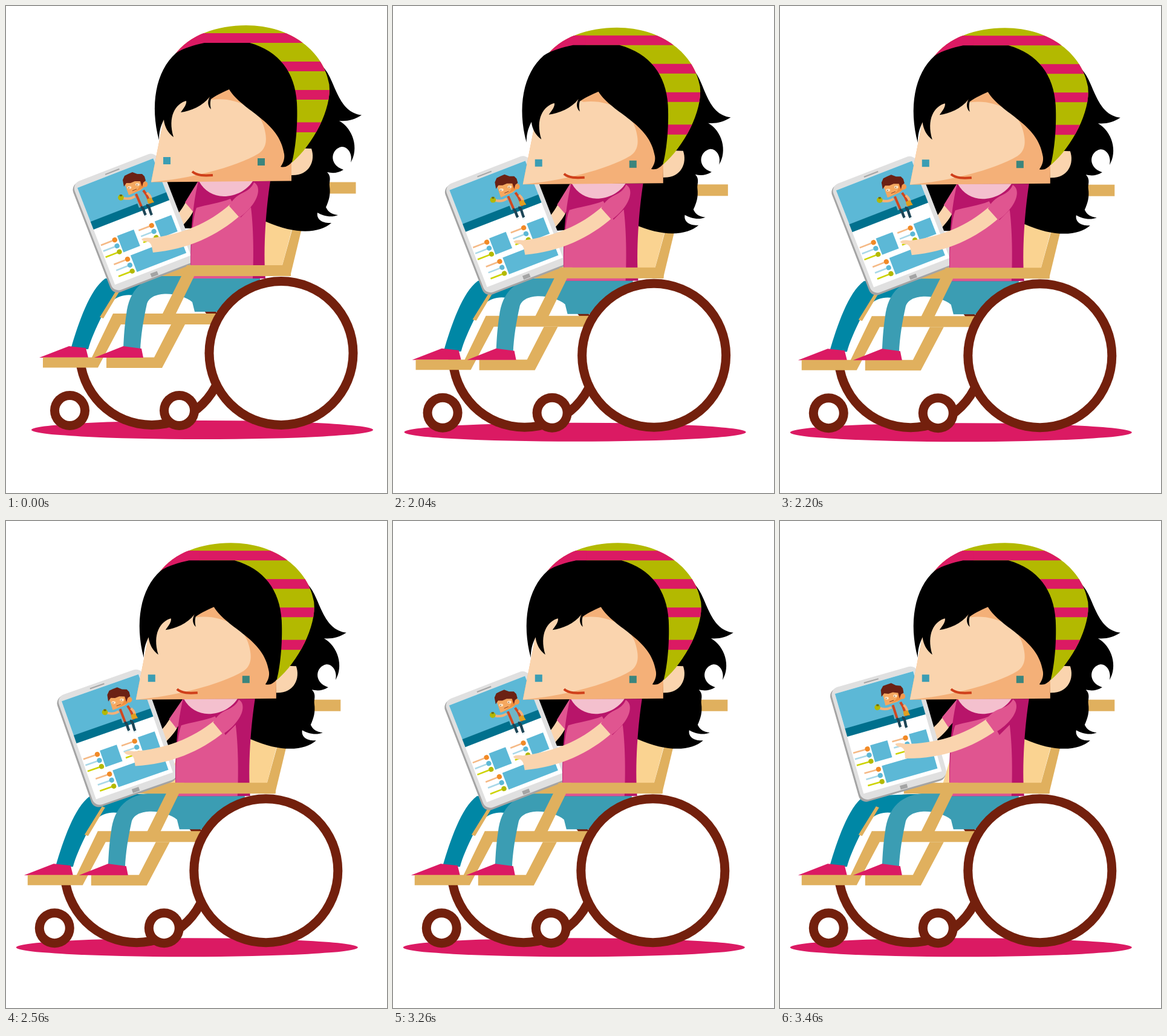
Recreate the animation shown at these times as an HTML page with a canvas. Size 630 px wide and 806 px high, loop 5500 ms.

```html
<!DOCTYPE html>
<html lang="en">
<head>
<meta charset="utf-8">
<title>Girl with tablet</title>
<style>
  html, body { margin: 0; width: 100%; height: 100%; overflow: hidden; background: #fff; }
  canvas { display: block; width: 630px; height: 806px; }
</style>
</head>
<body>
<canvas id="stage" width="630" height="806"></canvas>
<script>
const ctx = document.getElementById('stage').getContext('2d');
const LOOP = 5500, STEP = 40, RAD = Math.PI / 180;
const C = {
  tan: '#e0b05e', sand: '#fad391', brown: '#73200d', pink: '#db1a63',
  shirt: '#e05590', plum: '#b8156a', collar: '#f4c0ce',
  skin: '#fad4ae', shade: '#f4b078', teal: '#3b9db3', deep: '#0087a5',
  lime: '#b3b900', blue: '#5cb8d6', band: '#00708d', orange: '#f28a26', hair: '#000'
};

const paths = new Map();
function shape(d) {
  if (!paths.has(d)) paths.set(d, new Path2D(d));
  return paths.get(d);
}
function fill(color, d) {
  ctx.fillStyle = color;
  ctx.fill(shape(d));
}
function line(color, width, d) {
  ctx.strokeStyle = color;
  ctx.lineWidth = width;
  ctx.stroke(shape(d));
}
function rect(color, x, y, w, h) {
  ctx.fillStyle = color;
  ctx.fillRect(x, y, w, h);
}
function oval(color, x, y, rx, ry = rx) {
  ctx.fillStyle = color;
  ctx.beginPath();
  ctx.ellipse(x, y, rx, ry, 0, 0, 7);
  ctx.fill();
}
function wheel(x, y, r) {
  oval(C.brown, x, y, r);
  oval('#fff', x, y, r - 15);
}
function group(draw) {
  ctx.save();
  draw();
  ctx.restore();
}
function turn(x, y, deg) {
  ctx.translate(x, y);
  ctx.rotate(deg * RAD);
  ctx.translate(-x, -y);
}

function backHair() {
  fill(C.hair, 'M500 70L527 104C545 126 549 176 588 180.5C575 189 564 191 551 190' +
    'C574 203 584 236 570 259C574 244 564 232 555 233C538 236 532 262 558 271' +
    'C548 277 540 277 531 275C539 283 534 291 535 298C537 312 534 322 529 333' +
    'C533 342 540 345 549 346C537 351 524 347 515 342C513 353 523 360 538 359' +
    'C520 375 482 380 430 357L306 368L290 368L262 350V285L420 70Z');
}

function backrest() {
  fill(C.sand, 'M312 371L312 350H478L456 432H294Z');
  fill(C.tan, 'M476 360H491L470 447H452Z');
}

function rearArm() {
  fill(C.skin, 'M297 325L310 339C305 350 295 360 287 369L272 372L270 358C282 348 290 338 297 325Z');
  fill(C.shirt, 'M317 291L296 325L309 340L322 322L325 291Z');
}

function torso() {
  fill(C.plum, 'M318 290H437C430 335 425 400 429 451H306C304 400 306 340 318 290Z');
  fill(C.shirt, 'M306 451C305 400 308 350 315 334C330 329 355 326 371 319L388 350L405 333C409 365 410 410 408 451Z');
  fill(C.collar, 'M319 290H408C398 305 380 315 360 315C343 315 328 306 319 290Z');
}

function frontArm() {
  fill(C.skin, 'M224 386C227 383 234 383 240 384C290 378 335 360 371 328L388 346' +
    'C350 380 300 403 243 408L241 398C240 394 238 391 234 390C229 390 226 389 224 386Z');
  fill(C.shirt, 'M369 331L386 350C403 338 417 320 417 305C417 298 414 294 410 292' +
    'C406 301 400 305 392 309C381 314 374 321 369 331Z');
}

function legs() {
  fill(C.deep, 'M107 568C120 524 138 470 164 451L290 446L250 462L212 479C184 475 171 490 160 510C148 535 140 552 136 568Z');
  fill(C.tan, 'M155 515L184 468L189 470L161 517Z');
  fill(C.pink, 'M55 582L104 563L132 566L136 582Z');
  fill(C.tan, 'M61 581.5H142L177 509H350V527H190L152 598.5H61Z');
  fill(C.tan, 'M273 527H296L258 599H166V581.5H245Z');
  fill(C.teal, 'M194 567C195 545 196 530 199 510C204 470 225 447 270 446H420V506H312L308 490' +
    'C290 474 240 469 233 493C227 520 223 545 222 570Z');
  fill(C.pink, 'M146 582L194 563L224 567L227 582Z');
  rect(C.tan, 230, 429, 80, 18);
}

function chairFront() {
  rect(C.tan, 303, 429, 168, 18);
  fill(C.tan, 'M299 429H320L280 511H258Z');
}

// Three bullet lines, right-aligned on a column of dots
function bullets(x0, x1, y) {
  const rows = [['#f5b985', C.orange], ['#a9d8e8', C.blue], ['#cdd300', C.lime]];
  rows.forEach(([pale, strong], i) => {
    const cy = y + i * 10.6;
    rect(pale, x0, cy - 1.3, x1 - x0, 2.6);
    oval(strong, x1, cy, 4.1);
  });
}

function boy() {
  fill('#6fb5c6', 'M212 313L231 304L240 326L220 334Z');
  line('#d2461e', 4, 'M215 311L224 332M227 305L232 312L239 327');
  line(C.shade, 4, 'M213 315C207 319 202 320 194 318');
  line(C.shade, 4, 'M233 309C239 314 241 318 239 323');
  oval(C.lime, 190, 317, 4.8);
  rect('#6f6a12', 188, 312, 4, 3);
  fill('#e0a020', 'M233 320L240 317L245 325L235 327Z');
  line('#1d4657', 4.4, 'M223 333C228 333 227 340 231 346M232 330C238 330 237 339 241 346');
  line('#e9f4f6', 2.5, 'M229 349L233 347M239 349L243 347');
  oval('#f39a4e', 229.5, 295, 4.8);
  fill('#f5a860', 'M196 293L223 286L228 300L222 305L203 313Z');
  fill('#f08f3e', 'M223 288L228 300L203 313C217 306 224 300 221 288Z');
  fill('#6b2114', 'M195 299L193 288L196 281L202 278L209 275L217 278L225 278L229 282L231 289L227 292L225 299L222 290L213 290L206 293L199 293Z');
  oval('#fde3c4', 204, 300.5, 3.4, 2.2);
  oval('#fde3c4', 217.5, 295.5, 3.4, 2.2);
  oval('#8a6a50', 203, 301, 0.9);
  oval('#8a6a50', 216.5, 296, 0.9);
  line('#8d3a1c', 1, 'M209 306L216 303');
}

function screen() {
  const body = (color, x, y, w, h) => {
    ctx.fillStyle = color;
    ctx.beginPath();
    ctx.roundRect(x, y, w, h, 13);
    ctx.fill();
  };
  body('#a4a4a4', -9, -8, 149, 194.5);
  body('#e0e0e0', -6, -9.5, 148, 193);
  rect('#a4a4a4', 51, -5, 25, 2);
  rect('#a4a4a4', 61, 176, 12, 6.5);
  rect('#fff', 0, 0, 134.5, 172);
  rect(C.blue, 0, 0, 134.5, 60.5);
  rect(C.band, 0, 60, 134.5, 14);
  bullets(2, 26.5, 102.6);
  bullets(69, 92, 102.4);
  bullets(10.5, 34.8, 140);
  rect(C.blue, 32.5, 98, 29.5, 29);
  rect(C.blue, 99, 98, 29.5, 29);
  rect(C.blue, 41.5, 136, 87.5, 29.5);
}

function tablet(k) {
  ctx.translate(-10 * k, -14 * k);
  turn(180, 387, 5.2 * k);
  group(() => {
    ctx.translate(118, 301);
    ctx.rotate(-21.2 * RAD);
    screen();
  });
  boy();
}

function face() {
  fill(C.skin, 'M470 235L505 236C512 256 502 281 472 280Z');
  fill(C.shade, 'M262 180L240 291.5L472 289.5V200L400 130H300Z');
  fill(C.skin, 'M240 291.5C300 286 378 268 418 244C433 234 431 217 427 202C420 170 380 150 340 155L300 140L262 180Z');
  rect(C.teal, 260, 250, 12, 12);
  rect('#3b857d', 416, 252, 12, 12);
  line('#cf3f1a', 4, 'M308 274C316 281 328 281 342 280');
}

function hat() {
  ctx.clip(shape('M279 81C302 48 350 32 397 32C473 32 526 77 534.5 130C539 170 508 229 473 259L468 195L410 100L330 85Z'));
  rect(C.lime, 270, 30, 280, 240);
  for (const [y, h] of [[45, 16], [92, 16], [139, 16], [192.5, 16.5]]) rect(C.pink, 270, y, 280, h);
  rect(C.pink, 270, 45, 75, 40);
}

function frontHair() {
  fill(C.hair, 'M253 222C238 165 247 108 281 78C295 69 310 65 328 61H403C452 75 478 110 481 160' +
    'C483 200 478 240 473 258C468 264 462 268 454 266C459 259 461 252 460 245C452 190 392 175 369 138' +
    'C355 144 344 150 339 154C337 160 338 166 339 171C333 165 333 157 337 150C325 166 305 174 289 176' +
    'C295 168 299 162 298 157C280 162 267 183 277 217C268 210 262 200 261 188C255 200 253 210 253 222Z');
}

const easeOut = p => 1 - (1 - p) ** 2;
const ticks = (t, from) => Math.floor((t - from) / STEP);

// Lift of tablet and arms: two taps, the second one starts from rest
function lift(t) {
  if (t < 2560) return 0;
  const n = t < 3260 ? ticks(t, 2560) + 1 : ticks(t, 3260);
  return easeOut(Math.min(1, n / 5));
}

function draw(t) {
  const n = t < 2000 ? 0 : Math.min(6, ticks(t, 2000) + 1);
  const slide = 1 - Math.max(0, 1 - n / 3) ** 2.4;
  const sway = n ? Math.sin(Math.PI * (n - 1) / 5) / 0.95 : 0;
  const k = lift(t);
  const swayed = (dx, part) => group(() => { ctx.translate(dx * sway, 0); part(); });

  ctx.setTransform(1, 0, 0, 1, 0, 0);
  rect('#fff', 0, 0, 630, 806);
  ctx.translate(-25.2 * slide, 4.2 * slide ** 1.4);

  oval(C.pink, 324.5, 701.5, 282.5, 15.5);
  wheel(241, 574.5, 126.5);
  swayed(-2, () => rect(C.tan, 520, 291.5, 58.5, 19));
  backrest();
  group(() => {
    ctx.transform(1, 0, -0.028 * sway, 1, -5 * sway, 0);
    backHair();
  });
  legs();
  swayed(-2, () => { turn(325, 301, 8 * k); rearArm(); });
  swayed(-2, () => tablet(k));
  torso();
  chairFront();
  wheel(455, 574.5, 126.5);
  wheel(105.5, 669.5, 32.5);
  wheel(286.5, 669.5, 32.5);
  swayed(-2, () => { turn(420, 296, 6 * k); frontArm(); });
  swayed(-3, face);
  swayed(-5.5, hat);
  group(() => {
    ctx.transform(1 + 0.042 * sway, 0, 0, 1, -25 * sway, 0);
    frontHair();
  });
}

const start = performance.now();
function frame() {
  draw((performance.now() - start) % LOOP);
  requestAnimationFrame(frame);
}
frame();
</script>
</body>
</html>
```
